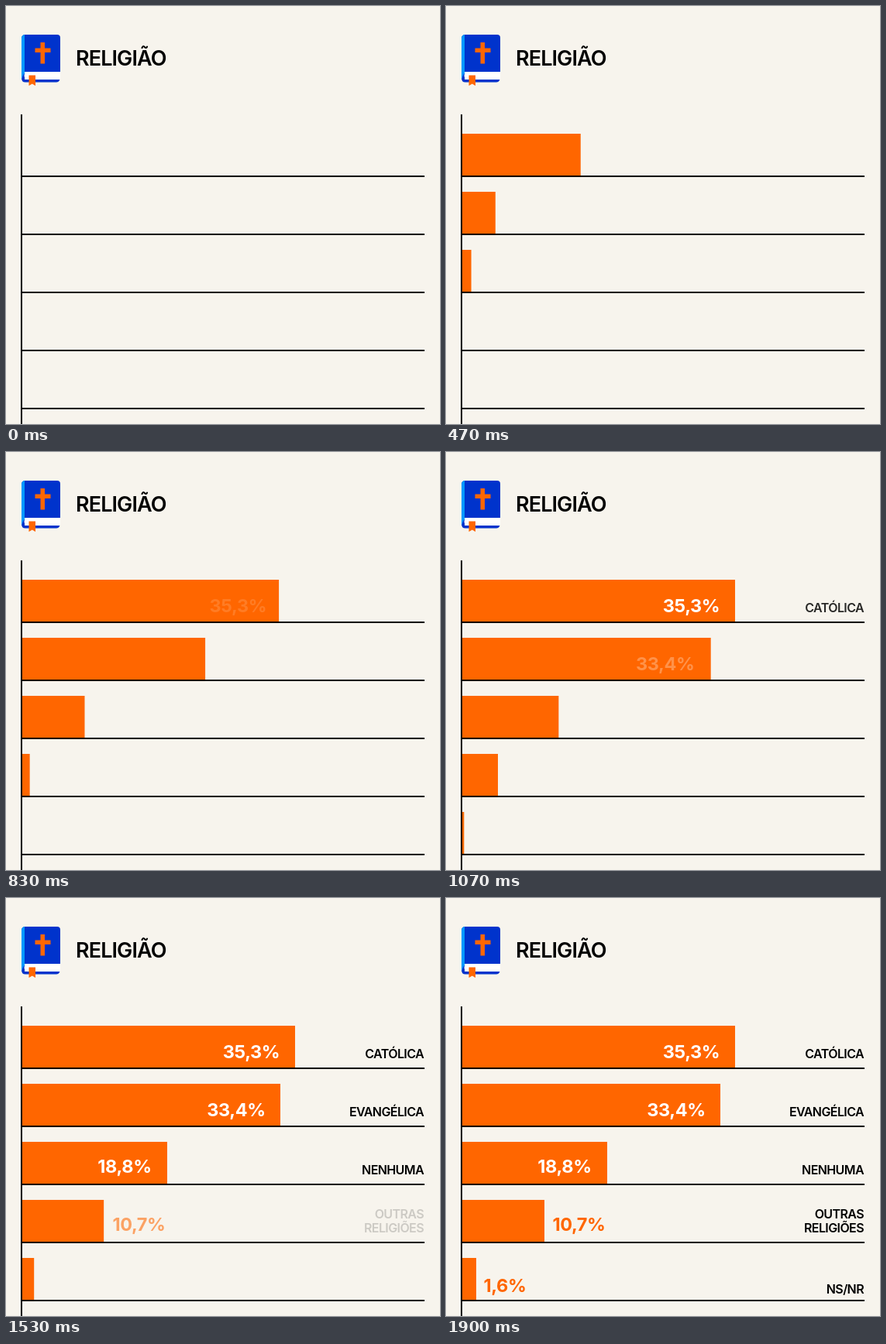
Animation of 560x540 px, one loop 1.96 s. Source, as an HTML page:

```html
<!DOCTYPE html>
<html lang="pt">
<head>
<meta charset="utf-8">
<style>
html, body { margin: 0; width: 100%; height: 100%; overflow: hidden; background: #f7f4ed; }
svg { display: block; font-family: Inter, "Open Sans", sans-serif; }
.title { font-size: 27px; font-weight: 600; letter-spacing: -.9px; }
.value { font-size: 23.5px; font-weight: 700; letter-spacing: -.4px; text-anchor: middle; }
.label { font-size: 16px; font-weight: 600; letter-spacing: -.6px; text-anchor: end; }
</style>
</head>
<body>
<svg width="560" height="540" viewBox="0 0 560 540">
  <path fill="#03c" d="M25 37H66Q70 37 70 41V85H24V95H69.5Q68 98.500 65 98.500H25Q20 98.500 20 93V42Q20 37 25 37Z"/>
  <path fill="#09f" d="M24 37V87Q21.500 89 20.500 94L20 93V42Q20 37.500 24 37Z"/>
  <path fill="#fff" d="M70 85H28.500A5 5 0 0 0 28.500 95H70Z"/>
  <path fill="#f60" d="M44.500 47H50V54.500H57.500V60H50V74.500H44.500V60H37.500V54.500H44.500ZM29.500 89.500H38V103L33.800 100.500L29.500 103Z"/>
  <text class="title" x="90" y="76.500">RELIGIÃO</text>
  <g id="chart"></g>
  <path stroke="#000" stroke-width="2" d="M20 140V540M20 220H540M20 295H540M20 370H540M20 445H540M20 520H540"/>
</svg>
<script>
const chart = document.getElementById('chart');
const clamp = x => Math.min(1, Math.max(0, x));

// Cubic ease in and out with a slightly longer tail.
function ease(x) {
  let s = x;
  for (let i = 0; i < 8; i++) s = x + .2 * s * s * (1 - s);
  return s * s * (3 - 2 * s);
}

function add(tag, attrs, text = '') {
  const el = document.createElementNS('http://www.w3.org/2000/svg', tag);
  for (const name in attrs) el.setAttribute(name, attrs[name]);
  el.textContent = text;
  return chart.appendChild(el);
}

const rows = [
  { width: 352, value: '35,3%', x: 316.5, y: 207, slide: 20, lines: ['CATÓLICA'], base: 207 },
  { width: 333, value: '33,4%', x: 297, y: 282, slide: 20, lines: ['EVANGÉLICA'], base: 282 },
  { width: 187, value: '18,8%', x: 153, y: 355, slide: 18, lines: ['NENHUMA'], base: 357, linear: true },
  { width: 106, value: '10,7%', x: 171.5, y: 430, slide: 0, lines: ['OUTRAS', 'RELIGIÕES'], base: 414 },
  { width: 18, value: '1,6%', x: 76, y: 509, slide: 0, lines: ['NS/NR'], base: 511 }
];

rows.forEach((row, i) => {
  row.bar = add('rect', { x: 21, y: 165 + 75 * i, height: 54, fill: '#f60' });
  row.text = add('text', { class: 'value', x: row.x, y: row.y, fill: i < 3 ? '#fff' : '#f60' }, row.value);
  row.labels = row.lines.map((line, j) =>
    add('text', { class: 'label', x: 539, y: row.base + 18 * j }, line));
});

function draw(now) {
  // Steps of a thirtieth of a second, on a 10 ms grid.
  const step = Math.floor((now % 1960 + 3.4) * .03);
  rows.forEach((row, i) => {
    const delay = 6 * i;
    const grown = row.linear
      ? clamp((step - 12.15) / 29.85)
      : ease(clamp((step - 2 - delay) / 27.7));
    const shown = clamp((step - 24 - delay) / 7);
    row.bar.setAttribute('width', row.width * grown);
    row.text.setAttribute('opacity', shown);
    row.text.setAttribute('x', row.x - row.slide * (1 - shown));
    for (const label of row.labels) label.setAttribute('opacity', clamp((step - 27 - delay) / 6));
  });
}

const start = performance.now();
function tick() {
  draw(performance.now() - start);
  requestAnimationFrame(tick);
}
tick();
</script>
</body>
</html>
```
